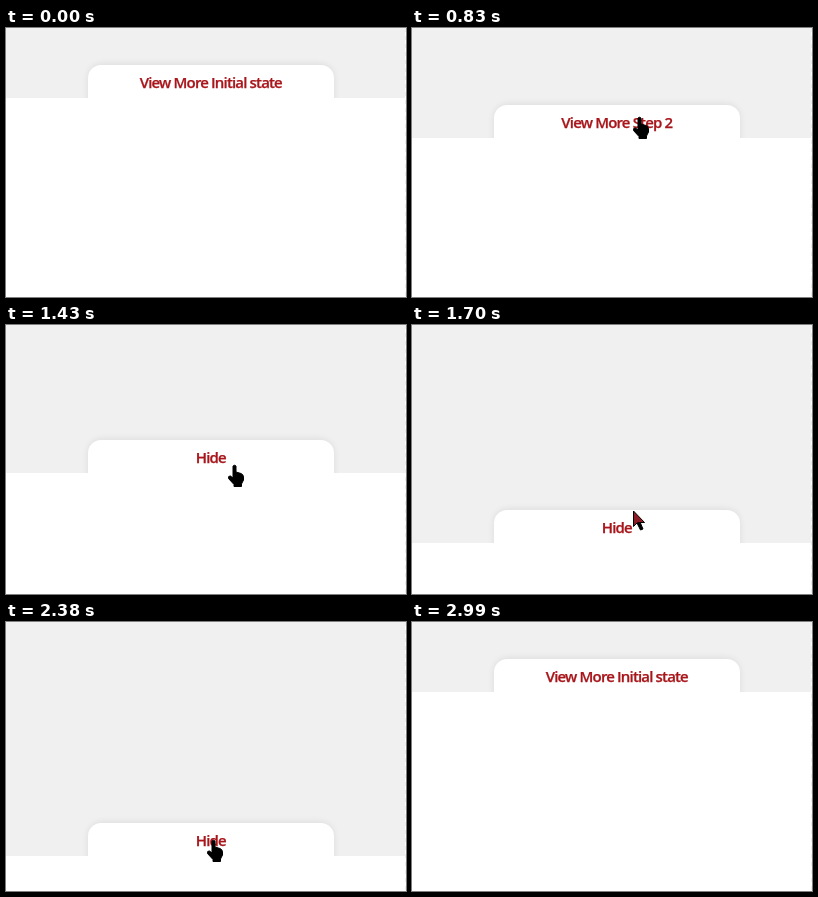
These frames come from a looping animation (400x269 px, 3.19 s). An HTML page:

```html
<!DOCTYPE html>
<html lang="en">
<head>
<meta charset="utf-8">
<title>View more panel</title>
<style>
  html, body { margin: 0; width: 100%; height: 100%; overflow: hidden; background: #fff; }
  svg { display: block; width: 100vw; height: 100vh; }
  text {
    font: 600 15px "Open Sans", "Noto Sans", sans-serif; letter-spacing: -.83px;
    fill: #a8161b; stroke: #a8161b; stroke-width: .25px;
  }
  .invert { mix-blend-mode: difference; }
</style>
</head>
<body>
<svg viewBox="0 0 400 269">
  <defs>
    <filter id="soft" x="-10%" y="-40%" width="120%" height="180%">
      <feGaussianBlur stdDeviation="3.5"/>
    </filter>
    <clipPath id="above"><rect y="-250" width="400" height="250"/></clipPath>
  </defs>
  <rect width="400" height="269" fill="#fff"/>
  <path d="M399.5 0V269" stroke="#ededed" stroke-dasharray="4 4"/>
  <!-- y = 0 in this group is the lower edge of the grey panel -->
  <g id="panel">
    <rect y="-250" width="399" height="250" fill="#f0f0f0"/>
    <g clip-path="url(#above)">
      <rect x="82" y="-34" width="246" height="60" rx="14" opacity=".08" filter="url(#soft)"/>
      <rect x="82" y="-33" width="246" height="60" rx="13" fill="#fff"/>
    </g>
    <text id="label" x="204.8" y="-10" text-anchor="middle"></text>
  </g>
  <g id="cursor">
    <path id="hand" stroke-linejoin="round" d="M-1 1Q.5-.5 2 1V7L7 8.500Q9.500 9.500 9.500 12V15L7.500 19V21.500H0V19.500L-5.500 13.500Q-6 10.500-3.500 11L-1 13Z"/>
    <g id="arrow">
      <path d="M4 13L7.500 20L10 19L7 12Z" stroke="#000"/>
      <path id="head" d="M.5 1V16.500L4 13L6.500 12.500H11.500Z" stroke="#000"/>
    </g>
  </g>
</svg>
<script>
const LOOP = 3190, TICK = LOOP / 47, SLIDE = 400;
const $ = id => document.getElementById(id);
const [panel, label, cursor, hand, arrow, head] =
  ['panel', 'label', 'cursor', 'hand', 'arrow', 'head'].map($);

const slides = [
  { at: 610, from: 70, to: 148, text: 'View More Step 2' },
  { at: 1411, from: 148, to: 234, text: 'Hide' },
  { at: 2393, from: 234, to: 70, text: 'View More Initial state' }
];

// time, x, y of the pointer's hot spot
const path = [
  [65, 265, 131], [475, 226, 44], [690, 226, 44], [950, 228, 139],
  [1420, 228, 139], [1697, 221, 185], [1900, 207, 218], [2780, 207, 218], [2900, 211, 234]
];

const clamp = v => Math.min(1, Math.max(0, v));
const swing = p => .5 - Math.cos(Math.PI * p) / 2;
const within = (t, a, b) => t >= a && t < b;

function pointerAt(t) {
  const i = Math.max(1, path.findIndex(k => k[0] >= t));
  const [t0, x0, y0] = path[i - 1], [t1, x1, y1] = path[i];
  const p = clamp((t - t0) / (t1 - t0));
  return [x0 + (x1 - x0) * p, y0 + (y1 - y0) * p].map(Math.round);
}

function draw(t) {
  const slide = slides.filter(s => t >= s.at).pop() || slides[2];
  const p = t < slides[0].at ? 1 : swing(clamp((t - slide.at) / SLIDE));
  const edge = Math.round(slide.from + (slide.to - slide.from) * p);
  panel.setAttribute('transform', `translate(0 ${edge})`);
  label.textContent = slide.text;

  const visible = within(t, 60, 2900);
  cursor.style.display = visible ? '' : 'none';
  if (!visible) return;
  cursor.setAttribute('transform', `translate(${pointerAt(t)})`);
  const pointing = within(t, 460, 1440) || within(t, 1800, 2770);
  hand.style.display = pointing ? '' : 'none';
  arrow.style.display = pointing ? 'none' : '';
  const inverted = pointing && t < 690;
  cursor.setAttribute('class', inverted ? 'invert' : '');
  const ink = inverted ? '#fff' : '#000';
  hand.setAttribute('fill', ink);
  hand.setAttribute('stroke', ink);
  head.setAttribute('fill', within(t, 1440, 1800) ? '#8b1c26' : '#000');
}

function frame(now) {
  const tick = Math.floor((now % LOOP) / TICK);
  draw(tick * TICK);
  requestAnimationFrame(frame);
}
draw(0);
requestAnimationFrame(frame);
</script>
</body>
</html>
```
